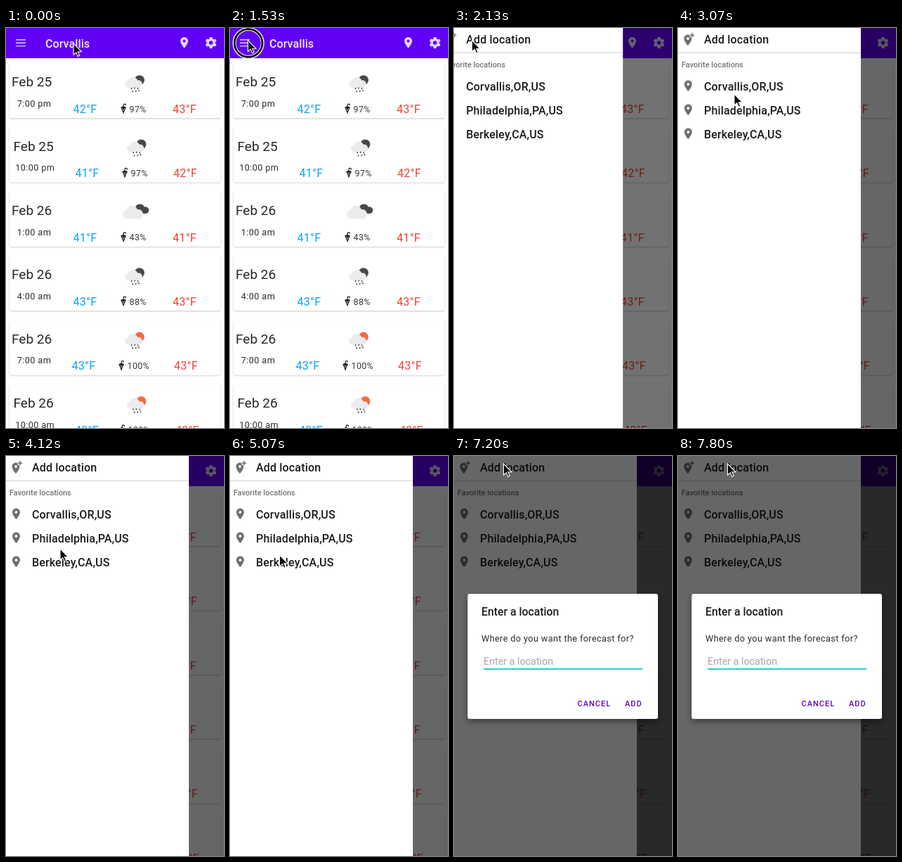
An HTML page that plays this animation: 310x569 px, repeating every 8 s.

```html
<!DOCTYPE html>
<html lang="en">
<head>
<meta charset="utf-8">
<title>Weather drawer</title>
<style>
  html, body { margin: 0; width: 100%; height: 100%; overflow: hidden; background: #fff; }
  svg { display: block; }
  text { font-family: Roboto, sans-serif; white-space: pre; }
  .date { font-size: 19px; fill: #262626; }
  .body { font-size: 12.7px; letter-spacing: .38px; fill: #2b2b2b; }
  .rain { font-size: 12.3px; letter-spacing: .4px; fill: #333; }
  .temp { font-size: 16px; letter-spacing: .3px; }
  .item { font-size: 16px; font-weight: 500; letter-spacing: .15px; fill: #1b1b1b; }
  .small { font-size: 11px; font-weight: 500; fill: #737373; }
  .button { font-size: 11px; font-weight: 500; letter-spacing: 1px; fill: #5a00d4; }
</style>
</head>
<body>
<svg id="stage" width="310" height="569" viewBox="0 0 310 569">
  <defs>
    <filter id="cardShadow" x="-5%" y="-10%" width="110%" height="125%">
      <feDropShadow dx="0" dy="1" stdDeviation=".8" flood-opacity=".22"/>
    </filter>
    <filter id="dialogShadow" x="-10%" y="-10%" width="120%" height="125%">
      <feDropShadow dx="0" dy="4" stdDeviation="5" flood-opacity=".4"/>
    </filter>
    <path id="pin" d="M0-10C-3.87-10-7-6.87-7-3c0 5.25 7 13 7 13s7-7.75 7-13c0-3.87-3.13-7-7-7zm0 9.5a2.5 2.5 0 1 1 0-5 2.5 2.5 0 0 1 0 5z"/>
    <path id="gear" d="M19.43 12.98c.04-.32.07-.64.07-.98s-.03-.66-.07-.98l2.11-1.65c.19-.15.24-.42.12-.64l-2-3.46c-.12-.22-.39-.3-.61-.22l-2.49 1c-.52-.4-1.08-.73-1.69-.98l-.38-2.65C14.46 2.18 14.25 2 14 2h-4c-.25 0-.46.18-.49.42l-.38 2.65c-.61.25-1.17.59-1.69.98l-2.49-1c-.23-.09-.49 0-.61.22l-2 3.46c-.13.22-.07.49.12.64l2.11 1.65c-.04.32-.07.65-.07.98s.03.66.07.98l-2.11 1.65c-.19.15-.24.42-.12.64l2 3.46c.12.22.39.3.61.22l2.49-1c.52.4 1.08.73 1.69.98l.38 2.65c.03.24.24.42.49.42h4c.25 0 .46-.18.49-.42l.38-2.65c.61-.25 1.17-.59 1.69-.98l2.49 1c.23.09.49 0 .61-.22l2-3.46c.12-.22.07-.49-.12-.64l-2.11-1.65zM12 15.5a3.5 3.5 0 1 1 0-7 3.5 3.5 0 0 1 0 7z"/>
    <path id="cloud" d="M-8 7a5 5 0 0 1-.6-9.9A7.2 7.2 0 0 1 5-3.6 5.4 5.4 0 0 1 7.6 7z"/>
    <g id="umbrella">
      <path d="M4 14V2.4Q4 .6 5.7.6T7.4 2.6" fill="none" stroke="#111" stroke-width="1.2"/>
      <path d="M.2 5.2Q4 3 7.8 5.2L4.8 12.5H3.2Z" fill="#111"/>
      <path d="M2.6 6L3.5 10.5M5.4 6L4.5 10.5" stroke="#fff" stroke-width=".6"/>
    </g>
    <g id="shower">
      <circle cx="6.3" cy="-4.8" r="7"/>
      <use href="#cloud" x="-1.5" y="-1" fill="#ececec"/>
      <path d="M-4.5 6l-1 2M0 5.5l-1 2M4.5 6l-1 2M-3 10l-1 2M1.6 9.8l-1 2M6 9l-1 2" stroke="#4a4a4a" stroke-width="1.5"/>
    </g>
    <g id="clouds">
      <use href="#cloud" transform="translate(8.5 -4)scale(.95 .9)" fill="#484848"/>
      <use href="#cloud" transform="translate(-2.5 1)scale(1.18 1.25)" fill="#ececec"/>
    </g>
  </defs>

  <g id="rows"></g>
  <rect width="310" height="43" fill="#6200f6"/>
  <g fill="#e3d5ff">
    <path d="M14 16.8h14M14 21.2h14M14 25.6h14" stroke="#dccbff" stroke-width="1.4"/>
    <use href="#pin" transform="translate(253.5 20.8)scale(.78)"/>
    <use href="#gear" transform="translate(281.9 11.4)scale(.8)"/>
  </g>
  <text x="56" y="27.5" font-size="16" font-weight="500" letter-spacing=".1" fill="#f6f0ff">Corvallis</text>

  <rect id="scrim" width="310" height="569" opacity="0"/>
  <g id="drawer">
    <rect width="260" height="569" fill="#fff"/>
    <path d="M0 35.3H260" stroke="#dedede" stroke-width="1.4"/>
    <g fill="#6f6f6f">
      <use href="#pin" transform="translate(14 17.3)scale(.78)"/>
      <path d="M20 6v8M16 10h8" stroke="#fff" stroke-width="4"/>
      <path d="M20 7v6.4M16.8 10.2h6.4" stroke="#6f6f6f" stroke-width="1.5"/>
    </g>
    <text class="item" x="37" y="22.3">Add location</text>
    <text class="small" x="5" y="56">Favorite locations</text>
    <g id="places"></g>
  </g>

  <rect id="dim" width="310" height="569" opacity="0"/>
  <g id="dialog">
    <rect x="19.5" y="196" width="270.5" height="178" rx="3" fill="#fff" filter="url(#dialogShadow)"/>
    <text x="39" y="227.3" font-size="15.8" font-weight="500" fill="#1b1b1b">Enter a location</text>
    <text class="body" x="39" y="264.3">Where do you want the forecast for?</text>
    <text x="42" y="297.3" font-size="14.3" fill="#a6a6a6">Enter a location</text>
    <path d="M42 303h226" stroke="#1fd5d3" stroke-width="1.8"/>
    <text class="button" x="175.5" y="355.6">CANCEL</text>
    <text class="button" x="243" y="355.6">ADD</text>
  </g>

  <g id="pointer">
    <g id="ring" fill="none">
      <circle cx=".7" cy="4" r="20" stroke="#fff" stroke-width="5"/>
      <circle cx=".7" cy="4" r="19.8" stroke="#000" stroke-width="2.8"/>
    </g>
    <path d="M0 0V16L3.8 12.6 6.2 18.2 8.7 17.2 6.3 11.8H11.5Z" stroke="#fff" stroke-width="1.1"/>
  </g>
</svg>
<script>
const $ = id => document.getElementById(id);
const DARK = '#484848', ORANGE = '#f4694a';

// date, its x, time, low, low x, rain, rain x, high, high x, icon, icon x, icon colour
const forecast = [
  ['Feb 25', 8, '7:00 pm', '42', 95.5, '97%', 163, '43', 237, 'shower', 183.5, DARK],
  ['Feb 25', 10.5, '10:00 pm', '41', 98.5, '97%', 165, '42', 238, 'shower', 186, DARK],
  ['Feb 26', 8, '1:00 am', '41', 95.5, '43%', 163, '41', 237, 'clouds', 183.5, DARK],
  ['Feb 26', 8, '4:00 am', '43', 95.5, '88%', 163, '43', 237, 'shower', 183.5, DARK],
  ['Feb 26', 8, '7:00 am', '43', 93.5, '100%', 160, '43', 239, 'shower', 183.5, ORANGE],
  ['Feb 26', 10.5, '10:00 am', '43', 98, '100%', 161, '43', 241, 'shower', 186, ORANGE]
];

$('rows').innerHTML = forecast.map(
  ([date, dateX, time, low, lowX, rain, rainX, high, highX, icon, iconX, color], i) => `
  <g transform="translate(0 ${i * 91.35})">
    <rect x="5" y="50" width="300" height="78" rx="3" fill="#fff" filter="url(#cardShadow)"/>
    <text class="date" x="${dateX}" y="83.2">${date}</text>
    <text class="body" x="${time.length > 7 ? 41.2 : 40}" y="112" text-anchor="middle">${time}</text>
    <text class="temp" x="${lowX}" y="121" fill="#0c9ff0">${low}°F</text>
    <use href="#umbrella" x="${rainX}" y="107.5"/>
    <text class="rain" x="${rainX + 12.6}" y="119.6">${rain}</text>
    <text class="temp" x="${highX}" y="121" fill="#ec4335">${high}°F</text>
    <use href="#${icon}" x="${iconX}" y="79" fill="${color}"/>
  </g>`).join('');

$('places').innerHTML = ['Corvallis,OR,US', 'Philadelphia,PA,US', 'Berkeley,CA,US'].map((name, i) => `
  <use href="#pin" transform="translate(14.5 ${82.3 + i * 34})scale(.78)" fill="#6f6f6f"/>
  <text class="item" x="37" y="${89 + i * 34}">${name}</text>`).join('');

// pointer stops: time, x, y
const stops = [
  [670, 96, 22], [1330, 25.5, 17.5], [2730, 25.5, 17.5], [3070, 80, 94], [3400, 82, 97],
  [3600, 82, 97], [3980, 77, 132], [4120, 77, 132], [4330, 82, 104], [4580, 50, 124],
  [4850, 70.5, 141], [5070, 70.5, 141], [5870, 70.5, 28], [5930, 70.5, 28], [6130, 70.5, 11]
];
const ramp = (t, from, to) => Math.min(1, Math.max(0, (t - from) / (to - from)));
const smooth = p => p * p * (3 - 2 * p);

function pointerAt(t) {
  let [, x, y] = stops[0];
  for (let i = 1; i < stops.length; i++) {
    const p = smooth(ramp(t, stops[i - 1][0], stops[i][0]));
    x += (stops[i][1] - stops[i - 1][1]) * p;
    y += (stops[i][2] - stops[i - 1][2]) * p;
  }
  return [x, y];
}

function draw() {
  const t = performance.now() % 8000;
  $('pointer').setAttribute('transform', `translate(${pointerAt(t)})`);
  $('ring').setAttribute('opacity',
    t < 1870 ? ramp(t, 1440, 1530) : t < 6870 ? ramp(t, 6310, 6530) : 0);

  const open = 1 - (1 - ramp(t, 1925, 2437)) ** 5;
  $('drawer').setAttribute('transform', `translate(${-260 * (1 - open)})`);
  $('scrim').setAttribute('opacity', .6 * open);

  const shown = 1 - (1 - ramp(t, 6900, 7130)) ** 2;
  const scale = .9 + .1 * shown;
  $('dim').setAttribute('opacity', .6 * shown);
  $('dialog').setAttribute('opacity', shown);
  $('dialog').setAttribute('transform', `translate(155 285)scale(${scale})translate(-155 -285)`);
  requestAnimationFrame(draw);
}
draw();
</script>
</body>
</html>
```
